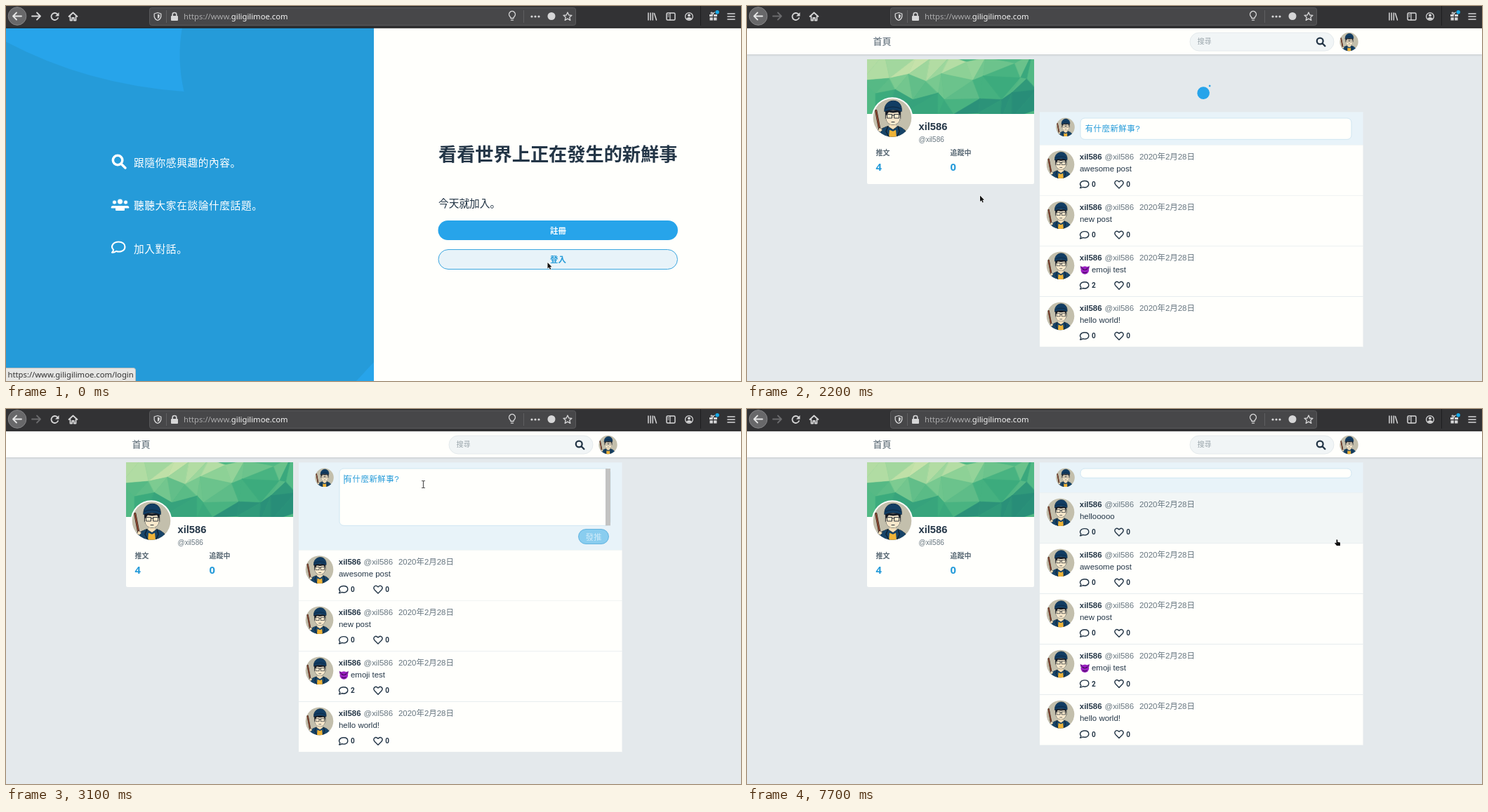
Animation, 1047 px wide and 535 px high, one loop 8 s. Source, as an HTML page with a canvas:

```html
<!DOCTYPE html>
<html lang="ja">
<meta charset="utf-8">
<title>Posting a message</title>
<style>
html, body { margin: 0; width: 100%; height: 100%; overflow: hidden; }
canvas { display: block; }
</style>
<canvas id="stage" width="1047" height="535"></canvas>
<script>
const g = document.getElementById('stage').getContext('2d');
const LOOP = 8000, STEP = 100;
const USER = 'xil586';
const SANS = '"Liberation Sans", "Noto Sans CJK JP", sans-serif';
const UI = '"Noto Sans", "Open Sans", sans-serif';
const COUNT = 'Roboto, sans-serif';
const WHITE = '#fffffc', BLUE = '#27a4ea', DEEP = '#259bd9', INK = '#243647', GREY = '#66757f',
      PAGE = '#e4e9ec', PALE = '#e8f3f9', SOFT = '#f1f5f6', ICON = '#d6d6d7';

const clamp = v => Math.max(0, Math.min(1, v));
const mix = (a, b, k) => a + (b - a) * k;
const ramp = (t, from, to) => clamp((t - from) / (to - from));
const easeInOut = k => k * k * (3 - 2 * k);

function box(x, y, w, h, fill, r = 0, stroke, width = 1) {
  g.beginPath();
  g.roundRect(x, y, w, h, r);
  if (fill) { g.fillStyle = fill; g.fill(); }
  if (stroke) { g.strokeStyle = stroke; g.lineWidth = width; g.stroke(); }
}

function disc(x, y, r, fill, stroke, width) {
  box(x - r, y - r, 2 * r, 2 * r, fill, r, stroke, width);
}

function path(d, x, y, fill, stroke, width = 1.5, scale = 1) {
  const p = new Path2D(d);
  g.save();
  g.translate(x, y);
  g.scale(scale, scale);
  g.lineCap = g.lineJoin = 'round';
  if (stroke) { g.strokeStyle = stroke; g.lineWidth = width; g.stroke(p); }
  if (fill) { g.fillStyle = fill; g.fill(p); }
  g.restore();
}

function text(s, x, y, size, color, { bold, align = 'left', font = SANS, spacing = 0 } = {}) {
  g.font = `${bold ? 'bold ' : ''}${size}px ${font}`;
  g.letterSpacing = spacing + 'px';
  g.textAlign = align;
  g.fillStyle = color;
  g.fillText(s, x, y);
  return x + g.measureText(s).width;
}

const magnifier = (x, y, color, s = 1) =>
  path('M3 -1.2A4.2 4.2 0 1 1 -5.4 -1.2A4.2 4.2 0 1 1 3 -1.2M2 2L5.6 5.6', x, y, null, color, 2.2, s);
const bubble = (x, y, color, s = 1) =>
  path('M-4.6 2.6C-8 -1 -4.5 -5 0.3 -5C4 -5 6.3 -3 6.3 -.4C6.3 4 1 5 -2 3.8C-3.5 5 -5 5.2 -6 5.1Q-4.8 4 -4.6 2.6Z',
    x, y, null, color, 1.4, s);
const heart = (x, y) =>
  path('M0 5.5L-5 .4C-8 -3.5 -3.6 -7.6 0 -3.6C3.6 -7.6 8 -3.5 5 .4Z', x, y, null, INK, 1.4);

function avatar(x, y, r) {
  g.save();
  disc(x, y, r, '#c3bfac');
  g.clip();
  g.translate(x, y);
  g.scale(r / 27, r / 27);
  path('M-23 -10L-18 16', 0, 0, null, '#33211d', 3.2);
  path('M-23 -10L-18 16', 0, 0, null, '#85452f', 2.2);
  path('M-4 6H5V17H-4Z', 0, 0, '#f3dfba');
  path('M-22 28Q-20 16 -7 12L1 17L8 12Q20 15 22 28Z', 0, 0, '#174468', '#10202e', 1);
  path('M-4 17L1 19L5 17L6 28H-5Z', 0, 0, '#efb337');
  path('M-6 12L-9 19L-4 28M8 12L10 19L6 28', 0, 0, null, '#10202e', 1.3);
  path('M-10 2V-11H12V2L10 -4L-7 -4Z', 0, 0, '#161b24');
  path('M-9 -8V0Q-8 9 1 10Q10 9 11 0V-8Q1 -12 -9 -8Z', 0, 0, '#f8e8cb', '#17202a', .8);
  path('M-9 -3V-10H11V-3L8 -8L1 -7L-5 -8Z', 0, 0, '#161b24');
  path('M-11 -9C-12 -29 15 -29 13 -9Q1 -14 -11 -9Z', 0, 0, '#123d63', '#0d2236', 1);
  path('M-10 -13Q1 -18 12 -13', 0, 0, null, '#0d2236', .8);
  path('M-7 -5H-.5V.5H-7ZM3 -5H9.5V.5H3ZM-.5 -3.5H3M-1 6H3', 0, 0, null, '#17202a', .9);
  path('M-18 14L-14 17L-17 20L-20 18Z', 0, 0, '#f3dfba', '#17202a', .8);
  g.restore();
}

// Low-poly banner: jittered grid, pale near the top left and teal far from it.
const banner = (() => {
  let seed = 11;
  const rnd = () => (seed = seed * 16807 % 2147483647) / 2147483647;
  const cols = 8, rows = 3, faces = [];
  const stops = [[222, 233, 178], [134, 207, 148], [62, 174, 126], [28, 124, 117]];
  const pts = Array.from({ length: rows + 1 }, (_, j) => Array.from({ length: cols + 1 }, (_, i) => [
    (i + (rnd() - .5) * .9) * 238 / cols, (j + (rnd() - .5) * .7) * 78 / rows]));
  const face = (...p) => {
    const u = (p[0][0] + p[1][0] + p[2][0]) / 714, v = (p[0][1] + p[1][1] + p[2][1]) / 234;
    const k = clamp(Math.hypot((u - .27) * .75, v * .75) + rnd() * .24 - .06) * 2.999, n = Math.floor(k);
    faces.push([p, `rgb(${stops[n].map((c, i) => Math.round(mix(c, stops[n + 1][i], k - n)))})`]);
  };
  for (let j = 0; j < rows; j++) for (let i = 0; i < cols; i++) {
    const a = pts[j][i], b = pts[j][i + 1], c = pts[j + 1][i], d = pts[j + 1][i + 1];
    face(a, b, c);
    face(b, c, d);
  }
  return faces;
})();

function drawBanner() {
  g.save();
  box(171, 76, 238, 78, '#52b985');
  g.clip();
  for (const [p, color] of banner) path(`M${p.join('L')}Z`, 171, 76, color, color, .6);
  g.restore();
}

function toolbar(tail, canForward) {
  box(0, 0, 1047, 31.5, '#323234');
  box(0, 30.5, 1047, 1, '#1b1b1d');
  disc(16, 14.5, 12.8, '#68686a', '#858587', 1);
  path('M6 0H-6M-1 -5L-6 0L-1 5', 16, 14.5, null, '#e6e6e6', 1.8);
  path('M-6 0H6M1 -5L6 0L1 5', 43, 14.5, null, canForward ? ICON : '#6b6b6d', 1.8);
  path('M4.6 2A5 5 0 1 1 3.5 -3.6', 69.5, 15, null, ICON, 1.8);
  path('M6 -6V-.5H.5Z', 69.5, 15, ICON);
  path('M-6 0L0 -5.5L6 0M-4 0V5.5H-1.3V2H1.3V5.5H4V0', 95.5, 15, null, ICON, 1.8);
  box(204.5, 2.5, 607, 25, '#474749', 3, '#5a5a5c');
  path('M0 -5.5L4.8 -4V0Q4 4 0 5.5Q-4 4 -4.8 0V-4Z', 216, 15, null, ICON, 1.3);
  path('M0 -3.2V3.2Q2.6 2 2.8 0V-2.5Z', 216, 15, ICON);
  box(228, 6, 1, 18, '#5f5f61');
  box(235, 14, 10, 7, ICON, 1);
  path('M-2.8 0V-2Q-2.8 -4.5 0 -4.5T2.8 -2V0', 240, 14, null, ICON, 1.6);
  let x = text('https://www.', 253, 18.5, 11.25, '#aaaaab', { font: UI });
  x = text('giligilimoe.com', x, 18.5, 11.25, '#f4f4f4', { font: UI });
  text(tail, x, 18.5, 11.25, '#aaaaab', { font: UI });
  path('M-2 3Q-2 1.5 -3.4 .2A4.4 4.4 0 1 1 3.4 .2Q2 1.5 2 3ZM-1.5 5.6H1.5', 721, 14.5, null, ICON, 1.4);
  box(737, 6, 1, 18, '#5f5f61');
  for (const dx of [-5, 0, 5]) disc(754 + dx, 15, 1.6, ICON);
  disc(777, 14.5, 5.5, ICON);
  path('M0 -6L1.8 -2L6 -1.7L2.8 1.1L3.8 5.4L0 3.1L-3.8 5.4L-2.8 1.1L-6 -1.7L-1.8 -2Z', 800, 15, null, ICON, 1.3);
  path('M-5.5 -5V5M-2.3 -5V5M.8 -5V5M3 -4.5L6 5', 920.5, 15, null, ICON, 1.5);
  box(941, 10, 12, 10, null, 1.5, ICON, 1.5);
  path('M-1 -5V5M-4 -2.4H-3M-4 0H-3', 947, 15, null, ICON, 1.2);
  disc(973, 15, 5.4, null, ICON, 1.3);
  disc(973, 13.2, 2, ICON);
  path('M-4 3Q0 -1 4 3Q0 6.5 -4 3Z', 973, 15, ICON);
  box(989, 0, 1, 28, '#1e1e20');
  path('M-5.5 -2.5H-.6V.6H-5.5ZM.6 -2.5H5.5V.6H.6ZM-5 1.8H-.6V6H-5ZM.6 1.8H5V6H.6Z', 1007.5, 14.5, ICON);
  path('M0 -3Q-5 -3.5 -2.5 -5.5Q0 -5 0 -3Q0 -5 2 -5.5', 1007.5, 14.5, null, ICON, 1.2);
  disc(1013.2, 8.8, 2.7, '#16a9e8');
  path('M-5 -4H5M-5 0H5M-5 4H5', 1033, 15, null, ICON, 1.6);
}

function navbar(searchX) {
  box(0, 31, 1047, 504, PAGE);
  g.save();
  g.shadowColor = '#0003';
  g.shadowBlur = 3;
  g.shadowOffsetY = 1;
  box(0, 31.5, 1047, 37.5, WHITE);
  g.restore();
  text('首頁', 179.5, 55.3, 13, '#52626e');
  box(searchX, 38, 205, 26, SOFT, 13, '#e4eaec');
  text('搜尋', searchX + 10.5, 54, 10, '#9aa5ab');
  magnifier(searchX + 186.5, 51.2, INK, 1.05);
}

function welcome() {
  box(0, 31, 524, 504, DEEP);
  path('M0 31V51Q115 112 253.5 122Q243 75 251 31ZM499 535L524 508V535Z', 0, 0, BLUE);
  box(524, 31, 523, 504, WHITE);
  magnifier(161, 222, '#fff', 1.6);
  for (const [dx, s] of [[-8, .75], [8, .75], [0, 1]]) {
    disc(162.5 + dx, 280 - (s === 1 ? 1 : 0), 4 * s, '#fff', DEEP, .8);
    box(162.5 + dx - 6.5 * s, 285, 13 * s, s === 1 ? 7 : 3.5, '#fff', [4, 4, 1, 1]);
  }
  bubble(160, 344, '#fff', 1.5);
  ['跟隨你感興趣的內容。', '聽聽大家在談論什麼話題。', '加入對話。'].forEach((s, i) =>
    text(s, 182, 229 + i * 61.3, 14.7, '#fff', { spacing: .6 }));
  text('看看世界上正在發生的新鮮事', 616, 221, 26.2, INK, { bold: true });
  text('今天就加入。', 616, 287, 14.7, INK);
  box(615.5, 306, 341.5, 28, BLUE, 14);
  text('註冊', 786.5, 324.6, 11.5, '#fff', { bold: true, align: 'center' });
  box(616, 347.5, 340.5, 28, PALE, 14, '#3ba6df');
  text('登入', 786.5, 366, 11.5, DEEP, { bold: true, align: 'center' });
  box(-1, 516.5, 185.5, 20, '#e6e6e4', [0, 3, 0, 0], '#bcbcba');
  text('https://www.giligilimoe.com/login', 2.5, 530, 11.25, '#333', { font: UI });
}

function login(t) {
  navbar(673.5);
  box(180, 78, 688, 265, WHITE, 3);
  box(180, 294, 688, 49, '#f2f6f6', [0, 0, 3, 3]);
  text('登入', 292.5, 144, 19.5, INK, { bold: true });
  for (const y of [169, 205.3]) box(292.5, y, 229.5, 24, t < 700 ? '#fff' : '#fcf9c6', 2, '#eeeed5', .6);
  if (t >= 700) {
    text(USER, 296.3, 185, 11.5, '#111');
    for (let i = 0; i < 12; i++) disc(299.6 + i * 6.97, 218.3, 2.6, '#111');
  }
  if (t >= 1700) box(290.8, 252.3, 53.4, 30.4, WHITE, 15.2, '#6cc0ee', 2.2);
  box(292.5, 254, 50, 27, t >= 1400 ? '#0c75b6' : BLUE, 13.5);
  text('登入', 317.5, 272, 11.5, '#fff', { align: 'center' });
  text('新加入？', 292.5, 322.5, 11.5, GREY);
  text('立即加入 »', 340, 322.5, 11.5, '#2590c8');
}

function profile() {
  box(171, 76, 238, 178, WHITE, 2);
  drawBanner();
  disc(207, 159.5, 29.3, WHITE);
  avatar(207, 159.5, 27.3);
  text(USER, 244.5, 177, 14.7, INK, { bold: true });
  text('@' + USER, 244.5, 193.5, 10, GREY);
  text('推文', 183.5, 212.8, 10, '#566672', { bold: true });
  text('追蹤中', 289.5, 212.8, 10, '#566672', { bold: true });
  text('4', 183.5, 235.3, 14.7, DEEP, { bold: true, font: UI });
  text('0', 289.5, 235.3, 14.7, DEEP, { bold: true, font: UI });
}

// Two chasing dots turning once every two seconds.
function spinner(t, y) {
  const phase = (t - 1969) / 2000;
  const size = p => { p %= 1; return easeInOut(p < .5 ? 2 * p : 2 - 2 * p); };
  g.save();
  g.translate(647, y);
  g.rotate(phase * 2 * Math.PI);
  disc(10.2, -6.8, 10.2 * size(phase), BLUE);
  disc(10.2, 6.8, 10.2 * size(phase + .5), BLUE);
  g.restore();
}

function imp(x, y) {
  path('M-6.5 -6Q-6.5 -2 -5 0L-1 -4.5Q-5 -3.5 -6.5 -6ZM6.5 -6Q6.5 -2 5 0L1 -4.5Q5 -3.5 6.5 -6Z', x, y, '#6d1590');
  disc(x, y + .6, 5.8, '#9a1fc0');
  path('M-3.6 -1.6L-.8 0M3.6 -1.6L.8 0M-2.5 3.6Q0 5 2.5 3.6', x, y, null, '#3d0a55', 1.3);
}

function post(y, message, replies, hover) {
  box(417, y, 460.5, 72.1, hover ? '#f2f6f6' : WHITE);
  box(417, y + 71.4, 460.5, .8, '#dfe6ea');
  avatar(446.5, y + 27.6, 19.8);
  text(USER, 473.8, y + 20.4, 11.4, INK, { bold: true });
  text('@' + USER, 509.5, y + 20.4, 11.46, GREY);
  text('2020年2月28日', 559, y + 20.4, 11.46, GREY);
  const emoji = message === 'emoji test';
  if (emoji) imp(481.3, y + 33.7);
  text(message, emoji ? 491 : 474, y + 37.4, 11.46, INK);
  bubble(480.5, y + 56, INK);
  text(replies, 491, y + 59.6, 10, INK, { bold: true, font: COUNT });
  heart(530, y + 56);
  text('0', 540.3, y + 59.6, 10, INK, { bold: true, font: COUNT });
}

const KEY_TIMES = [3700, 3900, 4000, 4200, 4400, 5600, 5800, 5900, 6100];
const MESSAGE = 'hellooooo';

function composer(t, top, height, boxHeight, open) {
  const spacing = .46, sent = t >= 7300;
  box(417, top, 460.5, height, PALE);
  avatar(453.5, top + 21.5, 13.3);
  box(475, top + 8.7, 386, boxHeight, WHITE, 6, '#cfe6f2');
  if (sent) return;
  const typed = MESSAGE.slice(0, KEY_TIMES.filter(k => k <= t).length);
  let end = 481.5;
  if (typed) end = text(typed, end, top + 28.3, 11.46, DEEP, { spacing });
  else text('有什麼新鮮事?', 481.7, top + 27.8, 11.46, DEEP, { spacing });
  if (!open) return;
  const blinkOff = (t >= 5300 && t < 5600) || t >= 6500;
  if (!blinkOff) box(end, top + 17.5, 1, 13.2, DEEP);
  box(854, top + 8.7, 7, boxHeight, '#c3c3c2');
  g.globalAlpha = typed ? 1 : .6;
  box(815.5, top + 95.2, 43, 21, '#4cb4ea', 10.5, '#3199d2');
  text('發推', 837, top + 110.2, 11.46, '#fff', { align: 'center' });
  g.globalAlpha = 1;
}

function home(t, mouse) {
  const offset = 75 * (1 - ramp(t, 2270, 2970)) ** 2;
  const grow = ramp(t, 2800, 3100), shrink = ramp(t, 7300, 7600);
  const top = 76.3 + offset;
  const height = mix(mix(47.2, 125.2, grow), 43.3, shrink);
  const boxHeight = mix(mix(30.3, 81.3, grow), 13.3, shrink);
  navbar(631);
  avatar(857.5, 51, 13.2);
  profile();
  if (offset > 0) spinner(t, 74 + offset * .51);
  composer(t, top, height, boxHeight, grow === 1);
  const posts = [['awesome post', 0], ['new post', 0], ['emoji test', 2], ['hello world!', 0]];
  if (t >= 7700) posts.unshift([MESSAGE, 0]);
  let hand = false;
  posts.forEach(([message, replies], i) => {
    const y = top + height + i * 72.1;
    const hover = mouse.x > 417 && mouse.x < 877 && mouse.y > y && mouse.y < y + 72;
    hand ||= hover;
    post(y, message, replies, hover);
  });
  return hand;
}

// Pointer stops: time, x, y.
const ROUTE = [[0, 771.5, 366], [100, 771.5, 366], [200, 774, 358], [500, 774, 358], [1000, 418, 272],
  [1100, 418, 272], [1400, 332, 270.5], [2200, 332, 270.5], [2700, 594, 107.5], [6900, 594, 107.5],
  [7300, 838, 183], [7700, 841, 186.5], [8000, 841, 186.5]];

function pointerAt(t) {
  const i = Math.max(1, ROUTE.findIndex(p => p[0] >= t));
  const [a, b] = [ROUTE[i - 1], ROUTE[i]], k = easeInOut(ramp(t, a[0], b[0]));
  return { x: mix(a[1], b[1], k), y: mix(a[2], b[2], k) };
}

function drawPointer({ x, y }, kind) {
  if (kind === 'beam') path('M-2 -5H2M0 -5V5M-2 5H2', x + .5, y, null, '#555', 1.2);
  else if (kind === 'hand') path('M-1.5 0Q0 -1 .4 1V3.3L4 4V8.5H-1L-4 4.8Q-3 3.5 -1.5 5Z', x, y, '#111', '#fff', 1);
  else path('M0 0V8.5L2 6.8L3.4 10L4.8 9.3L3.4 6.3H6Z', x, y, '#111', '#fff', 1);
}

function render(t) {
  const mouse = pointerAt(t);
  let kind = t >= 2700 && t < 7100 ? 'beam' : 'arrow';
  if (t < 600) welcome();
  else if (t < 2000) login(t);
  else if (home(t, mouse)) kind = 'hand';
  toolbar(t >= 600 && t < 2000 ? '/login' : '', t < 600);
  drawPointer(mouse, kind);
}

const start = performance.now();
(function tick() {
  render(Math.floor((performance.now() - start) % LOOP / STEP) * STEP);
  requestAnimationFrame(tick);
})();
</script>
</html>
```
